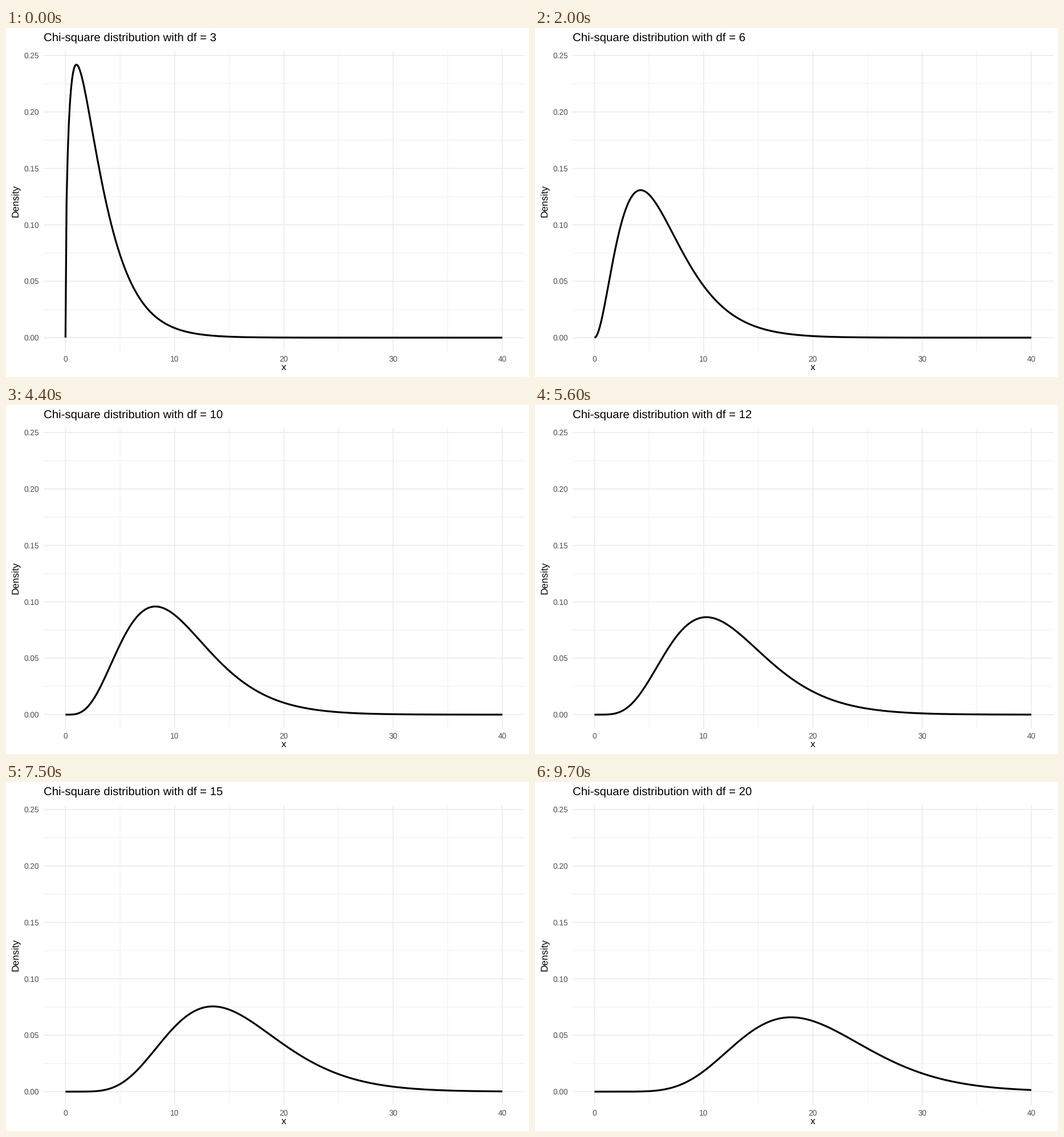
A matplotlib script for the animation above (10000 ms loop, 917 px wide and 611 px high).

```python
import math

import matplotlib.pyplot as plt
import numpy as np
from matplotlib.animation import FuncAnimation

W, H, DPI = 917, 611, 64
FRAMES, INTERVAL = 100, 100
PT = 72 / DPI  # points per pixel
LEFT, RIGHT, TOP, BOTTOM = 66.0, 908.5, 40.1, 566.0
FIRST_DF, LAST_DF = 3, 20
GRID, TICK_TEXT = "#ebebeb", "#4d4d4d"

plt.rcParams["font.family"] = "Liberation Sans"
plt.rcParams["text.hinting"] = "none"

fig = plt.figure(figsize=(W / DPI, H / DPI), dpi=DPI, facecolor="white")
ax = fig.add_axes([LEFT / W, 1 - BOTTOM / H,
                   (RIGHT - LEFT) / W, (BOTTOM - TOP) / H])
ax.axis("off")


def density(x, df):
    half = df / 2
    return x ** (half - 1) * np.exp(-x / 2) / (2 ** half * math.gamma(half))


def label(x, y, text, size, **style):
    """Text with its baseline at pixel (x, y), measured from the top left."""
    return fig.text(x / W, 1 - y / H, text, fontsize=size * PT,
                    **{"va": "baseline", **style})


def grid(xs, ys, width):
    style = dict(color=GRID, lw=width * PT, snap=False, zorder=1)
    for y in ys:
        ax.axhline(y, **style)
    for x in xs:
        ax.axvline(x, **style)


x = np.linspace(0, 40, 401)
curves = {df: density(x, df) for df in range(FIRST_DF, LAST_DF + 1)}
peak = curves[FIRST_DF].max()
ax.set_xlim(-2, 42)
ax.set_ylim(-0.05 * peak, 1.05 * peak)

x_ticks = np.arange(0, 41, 10)
y_ticks = np.arange(6) * 0.05
grid(x_ticks[:-1] + 5, y_ticks[:-1] + 0.025, 0.82)
grid(x_ticks, y_ticks, 1.65)

to_pixel = ax.transData.transform
for t in x_ticks:
    label(to_pixel((t, 0))[0], 583.5, f"{t}", 13.6, ha="center",
          color=TICK_TEXT)
for t in y_ticks:
    label(58.3, H - to_pixel((0, t))[1] + 4.9, f"{t:.2f}", 13.6, ha="right",
          color=TICK_TEXT)

label((LEFT + RIGHT) / 2, 599, "x", 17, ha="center")
label(20.7, (TOP + BOTTOM) / 2, "Density", 17, ha="right", va="center",
      rotation=90, rotation_mode="anchor").set(ha="center", va="baseline")
title = label(LEFT, 23.1, "", 20.4, ha="left")
curve, = ax.plot(x, curves[FIRST_DF], color="black", lw=3.2 * PT,
                 solid_capstyle="butt", solid_joinstyle="round",
                 clip_on=False, zorder=3)

# (first frame, steps) of each change to the next df
moves = [(2 + 6 * i, 4) for i in range(13)] + [(80 + 5 * i, 3) for i in range(4)]


def draw(frame):
    df, mix = FIRST_DF, 0.0
    for start, steps in moves:
        done = frame - start + 1
        if done >= steps:
            df += 1
        elif done > 0:
            mix = done / steps
    after = curves[min(df + 1, LAST_DF)]
    curve.set_ydata((1 - mix) * curves[df] + mix * after)
    nearest = df + (mix > 0.5)
    title.set_text(f"Chi-square distribution with df = {nearest}")
    return curve, title


anim = FuncAnimation(fig, draw, frames=FRAMES, interval=INTERVAL, repeat=True)
plt.show()
```
